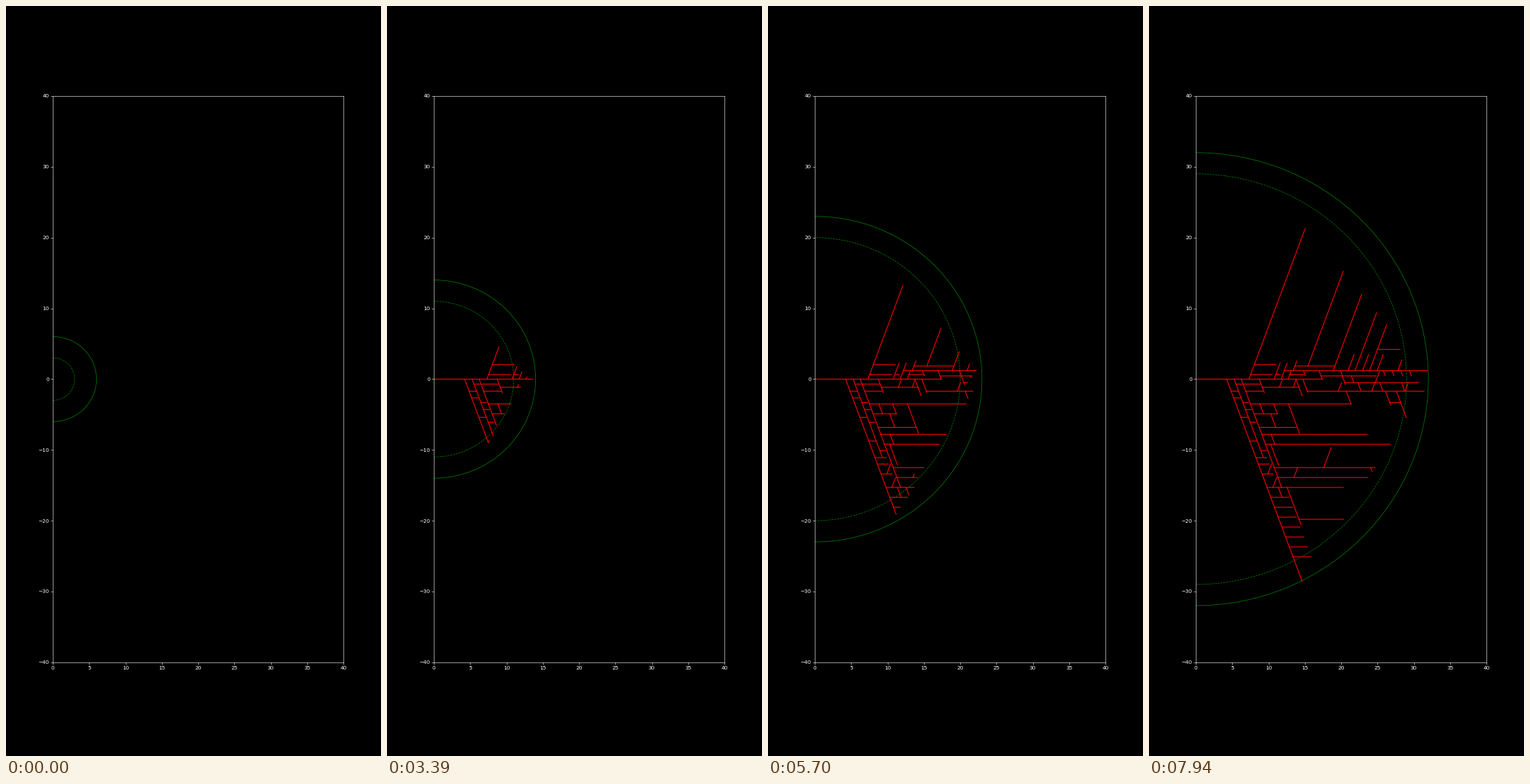
A matplotlib script that plays this animation: 529x1058 px, repeating every 8000 ms.

```python
import itertools

import numpy as np
import matplotlib.pyplot as plt
from matplotlib.animation import FuncAnimation
from matplotlib.collections import LineCollection
from matplotlib.patches import Circle

LOOP, INTERVAL = 8000, 20
STEPS = np.r_[0:351:70, 750, 940:7941:70]

# Distance of the leading tip over time, in ms.
LEAD_T = [0, 350, 750, 1500, 1850, 2340, 3390, 4370, 7940]
LEAD_R = [0, 2.55, 2.9, 6.05, 6.93, 8.95, 13.95, 16.95, 31.9]

LAG = .5                                # how far behind the lead shoots appear
SIN, COS = np.sin(np.radians(20)), np.cos(np.radians(20))
FLAT, UP, DOWN = (1, 0), (SIN, COS), (SIN, -COS)
PACE = {FLAT: .0043, UP: .00385, DOWN: .0045}   # units per ms


class Branch:
    def __init__(self, heading, cap, parent=None, root=0.0):
        self.heading, self.limit = np.array(heading), cap
        self.parent, self.root = parent, root
        self.pace = PACE[heading]
        self.start = parent.point(root) if parent else np.zeros(2)
        self.birth = 0
        if parent:
            passed = np.interp(np.hypot(*self.start) + LAG, LEAD_R, LEAD_T)
            self.birth = max(passed, parent.time_at(root))

    def point(self, s):
        return self.start + s * self.heading

    def time_at(self, s):
        if self.parent is None:
            return np.interp(s, LEAD_R, LEAD_T)
        return self.birth + s / self.pace

    def length(self, now):
        if self.parent is None:
            grown = np.interp(now, LEAD_T, LEAD_R)
        else:
            grown = (now - self.birth) * self.pace
        return min(grown, self.limit)

    def rooted(self):
        return self.parent is None or (
            self.root <= self.parent.limit and self.parent.rooted())


trunk = Branch(FLAT, 17.45)
branches = [trunk]


def sprout(parent, places, heading, cap=99):
    """Start shoots at x places on a flat parent, at y places on a slanted one."""
    axis = 0 if parent.heading[1] == 0 else 1
    shoots = [Branch(heading, cap, parent,
                     (p - parent.start[axis]) / parent.heading[axis])
              for p in np.atleast_1d(places)]
    branches.extend(shoots)
    return shoots if len(shoots) > 1 else shoots[0]


def cross(a, b):
    return a[0] * b[1] - a[1] * b[0]


def settle():
    """Where two paths meet, the later tip stops at the earlier line."""
    meetings = []
    for a, b in itertools.combinations(branches, 2):
        turn = cross(a.heading, b.heading)
        if abs(turn) < 1e-6:
            continue
        gap = b.start - a.start
        sa, sb = cross(gap, b.heading) / turn, cross(gap, a.heading) / turn
        if min(sa, sb) < 1e-3:
            continue
        first, last = sorted([(a.time_at(sa), sa, a), (b.time_at(sb), sb, b)],
                             key=lambda m: m[0])
        meetings.append((last, first))
    for (_, s, late), (_, r, early) in sorted(meetings, key=lambda m: m[0][0]):
        if s <= late.limit and r <= early.limit:
            late.limit = s


spread = np.linspace

# Three long diagonals below the trunk, with rungs between them
outer, inner = sprout(trunk, [4.23, 6.23], DOWN)
middle = sprout(trunk, 5.26, DOWN, 11.7)
sprout(outer, [-1.7, -2.65, -5.4, -8.75], FLAT, 1)
sprout(middle, [-.7, -3.3, -4.3, -6.1, -10.1], FLAT, .8)
sprout(inner, [-.7, -1.7], FLAT, 2.4)
rungs = sprout(outer, [-11.1, -12, -13.4], FLAT, 1.5)
sprout(rungs[2], 9.9, UP, 1.5)
sprout(outer, -spread(16.7, 25.1, 7), FLAT, 2.5)

# Long level shoots on the lower side
shelf = sprout(inner, -3.5, FLAT, 13.9)
sprout(shelf, [8.8, 10.7], DOWN, 1.5)
sprout(shelf, 12.75, DOWN, 4.4)
ledge = sprout(inner, [-4.9, -6.82], FLAT, 5.15)
sprout(ledge[0], 10.3, DOWN, 2)
sprout(sprout(inner, -7.8, FLAT, 14.5), 10.35, DOWN, 1.45)
sprout(sprout(inner, -9.2, FLAT), 10.3, DOWN, 3.1)
upper, lower = sprout(inner, [-12.5, -13.9], FLAT)
sprout(upper, 17.6, UP, 3)
sprout(upper, 24.05, DOWN, 2.5)
sprout(lower, 13.5, UP)
base = sprout(outer, -15.3, FLAT, 10.5)
sprout(base, 10.6, UP, 1.5)
sprout(base, 11.35, DOWN)
sprout(sprout(base, 12.55, DOWN, 5.6), -19.8, FLAT)

# Short growth around the trunk
mast = sprout(trunk, 7.3, UP)
sprout(mast, [.65, 2.05], FLAT, 3)
stub = sprout(trunk, 8.73, DOWN, 2.05)
sprout(sprout(stub, -1.15, FLAT, 6), [11.5, 13.4], UP)
twigs = sprout(trunk, [10.77, 11.74], UP, 2.4)
sprout(twigs[0], .65, FLAT, .6)
sprout(sprout(trunk, 12.7, UP, 1.2), .65, FLAT, 2)
sprout(trunk, 13.78, DOWN, 2.5)

# The upper rail carries the tall shoots
rail = sprout(twigs[1], 1.2, FLAT)
bar = sprout(sprout(rail, 13.4, UP, 1.45), 1.85, FLAT, 5.4)
sprout(bar, 15.42, UP)
sprout(rail, [18.9, 21.9], UP)
sprout(sprout(rail, 23.9, UP), 4.2, FLAT, 3.1)
sprout(rail, 20.95 + 2 * np.arange(3), UP, 2.4)
sprout(rail, 27.8, UP, 1.6)
sprout(rail, [14.8, 19.9, *spread(25.8, 29.4, 4)], DOWN, .75)

# Lower rails near the axis
thread = sprout(sprout(rail, 16.95, DOWN), .45, FLAT, 7.6)
sprout(thread, 21.4, DOWN, .9)
strand = sprout(sprout(thread, 20.15, DOWN, 1.3), -.5, FLAT)
sprout(strand, 24.7, UP, 1.7)
sprout(strand, spread(22.3, 28.3, 3), DOWN, 1.2)
keel = sprout(sprout(trunk, 14.72, DOWN, 2), -1.7, FLAT)
sprout(keel, spread(19.6, 28.8, 3), UP, 1.3)
sprout(keel, 20.7, DOWN, 1.9)
sprout(sprout(keel, 26.1, DOWN, 2), -3.3, FLAT, 1.5)
sprout(keel, 27.6, DOWN)

settle()
branches = [b for b in branches if b.rooted()]

plt.style.use("dark_background")
fig, ax = plt.subplots(figsize=(10, 20), dpi=52.9)
fig.subplots_adjust(left=.125, right=.9, bottom=.125, top=.88)
ax.set(xlim=(0, 40), ylim=(-40, 40),
       xticks=range(0, 41, 5), yticks=range(-40, 41, 10))

front = ax.add_patch(Circle((0, 0), 6, fill=False, ec="g", lw=1))
rear = ax.add_patch(Circle((0, 0), 3, fill=False, ec="g", lw=1, ls="--"))
tree = LineCollection([], colors="r", linewidths=1.5,
                      capstyle="projecting", zorder=2)
tree.set_snap(False)
ax.add_collection(tree, autolim=False)


def draw(i):
    now = STEPS[np.searchsorted(STEPS, i * INTERVAL, side="right") - 1]
    tree.set_segments([(b.start, b.point(b.length(now)))
                       for b in branches if now > b.birth])
    radius = max(6, np.ceil(np.interp(now, LEAD_T, LEAD_R)))
    front.set_radius(radius)
    rear.set_radius(radius - 3)
    return front, rear, tree


anim = FuncAnimation(fig, draw, frames=LOOP // INTERVAL, interval=INTERVAL,
                     repeat=True, repeat_delay=0)
plt.show()
```
